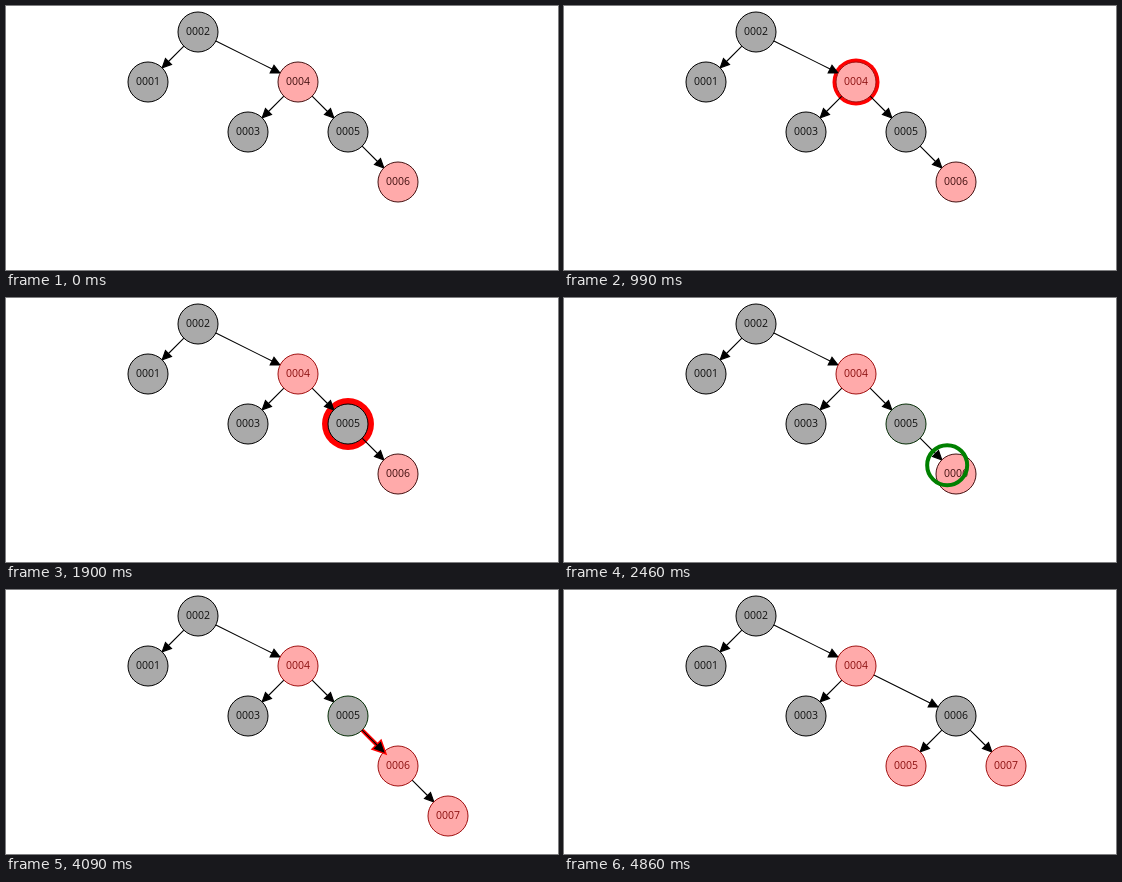
An HTML page that plays this animation: 552 by 264 pixels, repeating every 5.26 s.

```html
<!DOCTYPE html>
<html lang="en">
<head>
<meta charset="utf-8">
<title>Tree insertion</title>
<style>
  html, body { margin: 0; width: 100%; height: 100%; overflow: hidden; background: #fff; }
  svg { display: block; }
  text { font: 10.5px "Open Sans", "Noto Sans", sans-serif; text-anchor: middle; }
</style>
</head>
<body>
<svg id="stage" width="552" height="264" viewBox="0 0 552 264">
  <g id="halos"></g>
  <g id="edges"></g>
  <g id="nodes"></g>
  <g id="marks"></g>
</svg>
<script>
const LOOP = 5260, R = 20;
const GRAY = '#aaa', PINK = '#faa';
const ROTATE = 4510, INSERT = 3030;

const home = {
  1: [142, 76], 2: [192, 26], 3: [242, 126], 4: [292, 76],
  5: [342, 126], 6: [392, 176], 7: [442, 226]
};
const entry = [20, 112.5];
const rotated = { 5: [342, 176], 6: [392, 126], 7: [442, 176] };

// node, start, end, how far the halo reaches beyond the node
const pulses = [
  [2, 130, 640, 6.3],
  [4, 920, 1445, 4.6],
  [5, 1740, 2250, 6.3],
  [6, 2545, 2990, 4.6]
];
// from, to, start
const hops = [[2, 4, 640], [4, 5, 1445], [5, 6, 2250]];

// the picture advances in discrete ticks
const ticks = [0];
const addTicks = (from, to) => { for (let t = from; t <= to; t += 70) ticks.push(t); };
addTicks(220, 2950);
ticks.push(3030, 3100, 3150, 3220, 3300);
addTicks(4090, 4860);

const clamp = x => Math.max(0, Math.min(1, x));
const mix = (a, b, f) => a.map((v, i) => v + (b[i] - v) * f);
const swell = (t, from, to) =>
  t <= from || t >= to ? 0 : Math.sin(Math.PI * (t - from) / (to - from)) ** 0.3;

function make(tag, parent, attrs = {}) {
  const el = document.createElementNS('http://www.w3.org/2000/svg', tag);
  set(el, attrs);
  document.getElementById(parent).append(el);
  return el;
}
function set(el, attrs) {
  for (const k in attrs) el.setAttribute(k, attrs[k]);
}
const show = (el, on) => set(el, { visibility: on ? 'visible' : 'hidden' });

const nodes = {};
for (const id in home) {
  nodes[id] = {
    circle: make('circle', 'nodes', { r: R }),
    label: make('text', 'nodes')
  };
  nodes[id].label.textContent = id.padStart(4, '0');
}
const halos = pulses.map(() => make('circle', 'halos', { fill: '#f00' }));
const edges = Array.from({ length: 6 }, () =>
  make('path', 'edges', { stroke: '#000', 'stroke-width': 1.1 }));
const glow = make('path', 'marks', { fill: '#f00', stroke: '#f00' });
const glowCore = make('path', 'marks', { stroke: '#000', 'stroke-width': 1.1 });
const ring = make('circle', 'marks',
  { r: R, fill: 'none', stroke: '#008000', 'stroke-width': 4 });

function arrow([ax, ay], [bx, by]) {
  const len = Math.hypot(bx - ax, by - ay) || 1;
  const ux = (bx - ax) / len, uy = (by - ay) / len;
  const tipX = bx - ux * R, tipY = by - uy * R;
  const baseX = tipX - ux * 9, baseY = tipY - uy * 9;
  return `M${ax + ux * R} ${ay + uy * R}L${baseX} ${baseY}` +
    `M${tipX} ${tipY}L${baseX - uy * 4.3} ${baseY + ux * 4.3}` +
    `L${baseX + uy * 4.3} ${baseY - ux * 4.3}Z`;
}

function place(id, t) {
  if (t > ROTATE && rotated[id]) return mix(home[id], rotated[id], clamp((t - ROTATE) / 255));
  if (id == 7) return mix(entry, home[7], clamp((t - INSERT) / 240));
  return home[id];
}

function links(t) {
  const list = [[2, 1], [2, 4], [4, 3]];
  if (t > ROTATE) list.push([4, 6], [6, 5]);
  else list.push([4, 5], [5, 6]);
  if (t >= INSERT) list.push([6, 7]);
  return list;
}

function look(id, t) {
  const turned = t > ROTATE;
  const red = id == 4 || id == 7 || id == (turned ? 5 : 6);
  if (!red) {
    const line = id == 5 && t > 2250 ? '#062e06' : '#000';
    return { fill: GRAY, line, ink: '#111' };
  }
  const fresh = (id == 4 && t < 990) || (id == 6 && t < 2530);
  return { fill: PINK, line: fresh ? '#411' : '#a01010', ink: fresh ? '#411' : '#8c1010' };
}

function draw(t) {
  const at = {};
  for (const id in nodes) {
    const [x, y] = at[id] = place(id, t);
    const { fill, line, ink } = look(id, t);
    set(nodes[id].circle, { cx: x, cy: y, fill, stroke: line });
    set(nodes[id].label, { x, y: y + 3.3, fill: ink });
  }
  show(nodes[7].circle, t >= 2950);
  show(nodes[7].label, t >= 2950);

  const list = links(t);
  edges.forEach((el, i) => {
    show(el, i < list.length);
    if (list[i]) set(el, { d: arrow(at[list[i][0]], at[list[i][1]]) });
  });

  pulses.forEach(([id, from, to, reach], i) => {
    const s = swell(t, from, to);
    show(halos[i], s > 0);
    set(halos[i], { cx: at[id][0], cy: at[id][1], r: R + reach * s });
  });

  const hop = hops.find(([, , from]) => t >= from && t < from + 260);
  show(ring, hop);
  if (hop) {
    const [x, y] = mix(home[hop[0]], home[hop[1]], clamp((t - hop[2]) / 255));
    set(ring, { cx: x, cy: y });
  }

  const heat = swell(t, 4000, ROTATE);
  const d = arrow(home[5], home[6]);
  show(glow, heat > 0);
  show(glowCore, heat > 0);
  set(glow, { d, 'stroke-width': 5 * heat });
  set(glowCore, { d });
}

const start = performance.now();
let last = -1;
function frame() {
  const now = (performance.now() - start) % LOOP;
  const t = ticks.filter(k => k <= now).pop() ?? 0;
  if (t !== last) draw(last = t);
  requestAnimationFrame(frame);
}
frame();
</script>
</body>
</html>
```
